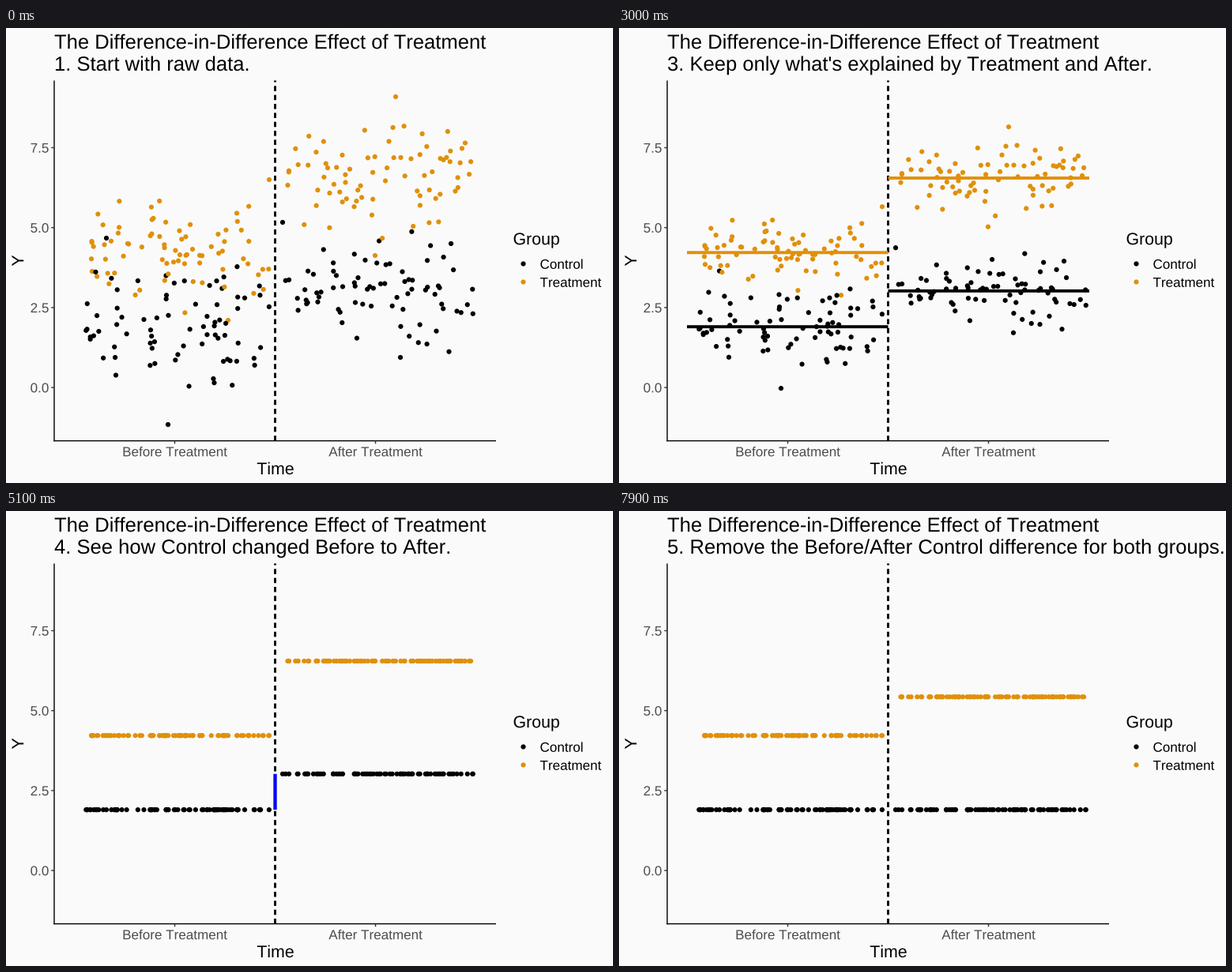
Recreate the animation shown at these times as a matplotlib script. Size 768 by 576 pixels, loop 8 s.

```python
import numpy as np
import matplotlib.pyplot as plt
from matplotlib.animation import FuncAnimation
from matplotlib.patches import PathPatch
from matplotlib.textpath import TextPath
from matplotlib.transforms import Affine2D

W, H, DPI = 768, 576, 96
FRAMES, STEP = 80, 100
PT = 72 / DPI  # points per pixel

plt.rcParams.update({
    "font.family": "Liberation Sans",
    "text.kerning_factor": 6,
    "path.snap": False,
    "toolbar": "None",
})

BLACK, ORANGE, BLUE = "#000000", "#E0900A", "#0000FF"
BACK, TICK, LABEL = "#FAFAFA", "#333333", "#4D4D4D"
LEFT, RIGHT, TOP, BOTTOM, MID = 61, 620, 66.5, 522.6, 340.5
ZERO, UNIT = 455.1, 40.48  # pixel row of Y = 0, pixels per unit of Y
BASE, BIG, SMALL = 21.33, 25.6, 17.07

HEAD = "The Difference-in-Difference Effect of Treatment"
STEPS = [
    (0, "1. Start with raw data."),
    (500, "2. Explain Y using Treatment and After."),
    (2600, "3. Keep only what's explained by Treatment and After."),
    (4700, "4. See how Control changed Before to After."),
    (6800, "5. Remove the Before/After Control difference for both groups."),
]


def row(value):
    return ZERO - UNIT * value


# Control and treatment before, then control and treatment after
MEANS = row(np.array([1.9, 4.22, 3.02, 6.55]))
COLORS = [BLACK, ORANGE, BLACK, ORANGE]
EXTREMES = [[(205, 502), (127, 266)], [(333, 192), (281, 370)],
            [(350, 246), (499, 417)], [(493, 87), (467, 288)]]
COUNT = 77

# Raw data: normal scatter around each mean, plus the two extremes
rng = np.random.default_rng(7)
group = rng.permutation(np.repeat(np.arange(4), COUNT))
x = np.where(group < 2, 93, 350) + rng.uniform(0, 241, group.size)
z = rng.normal(size=group.size)
z[abs(z) > 2] *= 0.5
y = MEANS[group] + 0.95 * UNIT * z
for g, ends in enumerate(EXTREMES):
    x[np.flatnonzero(group == g)[:2]], y[np.flatnonzero(group == g)[:2]] = zip(*ends)

fig = plt.figure(figsize=(W / DPI, H / DPI), dpi=DPI, facecolor=BACK)
ax = fig.add_axes([0, 0, 1, 1])
ax.set(xlim=(0, W), ylim=(H, 0))
ax.axis("off")


def line(xs, ys, color, width, z, **kw):
    return ax.plot(xs, ys, color=color, lw=width * PT, zorder=z,
                   solid_capstyle="butt", dash_capstyle="butt", **kw)[0]


def text(x, y, s, size, color=BLACK, align=0, angle=0):
    """Text outline on baseline y; align is 0 left, 0.5 centre, 1 right."""
    path = TextPath((0, 0), s, size=size)
    shift = -align * path.get_extents().x1
    place = Affine2D().translate(shift, 0).scale(1, -1)
    place.rotate_deg(-angle).translate(x, y)
    return ax.add_patch(PathPatch(path, fc=color, lw=0, zorder=6,
                                  transform=place + ax.transData))


def dots(xs, ys, colors):
    return ax.scatter(xs, ys, s=(6.2 * PT) ** 2, c=colors,
                      linewidths=0, zorder=3)


# Axes
line([LEFT, LEFT], [TOP, BOTTOM + 0.7], BLACK, 1.42, 1)
line([LEFT - 0.7, RIGHT], [BOTTOM, BOTTOM], BLACK, 1.42, 1)
for value in np.arange(0, 10, 2.5):
    r = row(value)
    line([LEFT - 3.7, LEFT], [r, r], TICK, 1.42, 1)
    text(53.7, r + 6.2, f"{value:.1f}", SMALL, LABEL, align=1)
for c, name in [(213.5, "Before"), (467.5, "After")]:
    line([c, c], [BOTTOM, BOTTOM + 3.7], TICK, 1.42, 1)
    text(c, 542.2, name + " Treatment", SMALL, LABEL, align=0.5)
text(MID, 565, "Time", BASE, align=0.5)
text(22.2, 294.7, "Y", BASE, align=0.5, angle=90)
line([MID, MID], [BOTTOM, TOP], BLACK, 2.845, 2, dashes=(2.3, 1.69))

# Legend
text(641.5, 274.2, "Group", BASE)
for r, name, color in [(298.2, "Control", BLACK), (321.2, "Treatment", ORANGE)]:
    dots([653.7], [r], [color])
    text(675.5, r + 6.6, name, SMALL)

# Moving parts
text(LEFT, 26.2, HEAD, BIG)
titles = [TextPath((0, 0), s, size=BIG) for _, s in STEPS]
subtitle = text(LEFT, 54, STEPS[0][1], BIG)
scatter = dots(x, y, [COLORS[g] for g in group])
bars = [line([MID - 254.5, MID] if i < 2 else [MID, MID + 254.5], [m, m],
             COLORS[i], 3.9, 4) for i, m in enumerate(MEANS)]
gap = line([MID, MID], [MEANS[2], MEANS[0]], BLUE, 4.3, 5)


def ease(t, start, length=1200):
    u = np.clip((t - start) / length, 0, 1)
    return (1 - np.cos(np.pi * u)) / 2


def draw(i):
    t = i * STEP
    subtitle.set_path(titles[sum(at <= t for at, _ in STEPS) - 1])

    drop = ease(t, 6700) * (MEANS[0] - MEANS[2])
    now = y + (MEANS[group] - y) * ease(t, 2500) + drop * (group >= 2)
    scatter.set_offsets(np.column_stack([x, now]))

    for bar in bars:
        bar.set_visible(900 <= t < 4700)
    gap.set_ydata([MEANS[2] + drop, MEANS[0]])
    gap.set_visible(5100 <= t < 7900)
    return [subtitle, scatter, gap, *bars]


anim = FuncAnimation(fig, draw, frames=FRAMES, interval=STEP,
                     repeat=True, repeat_delay=0, blit=False)
plt.show()
```
